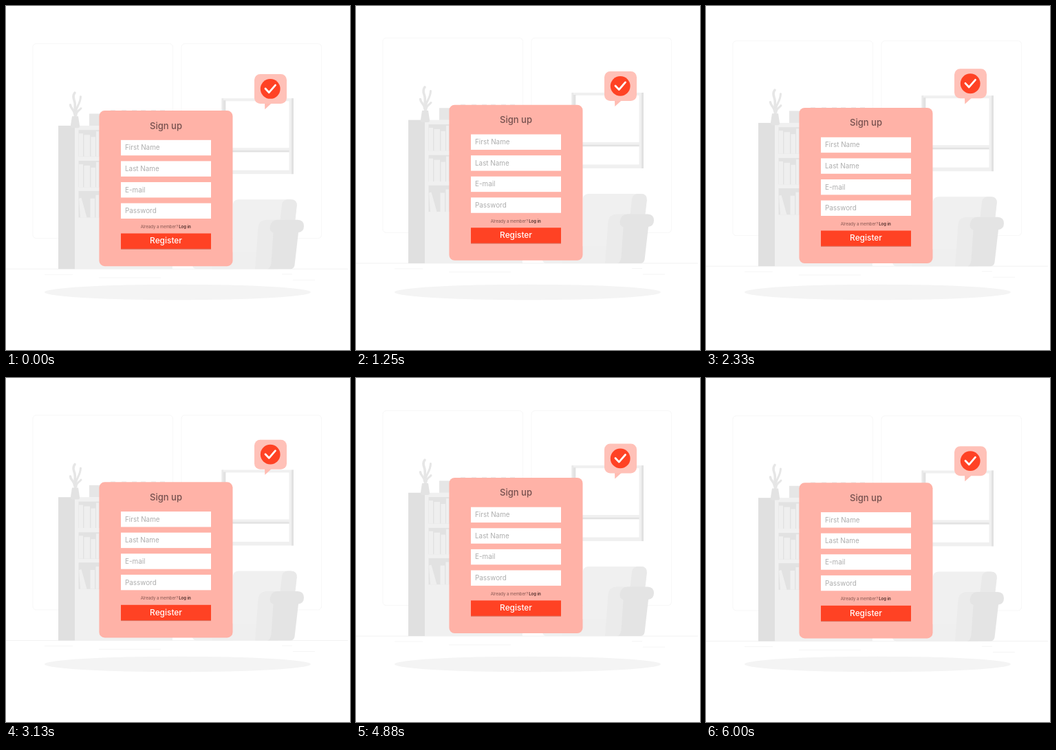
Write an HTML page with a canvas that moves like this. It is 500 by 500 pixels and loops after 6.04 s.

```html
<!DOCTYPE html>
<html lang="en">
<head>
<meta charset="utf-8">
<title>Sign up</title>
<style>
html, body { margin: 0; width: 100%; height: 100%; overflow: hidden; background: #fff; }
canvas { display: block; width: 500px; height: 500px; }
</style>
</head>
<body>
<canvas id="stage"></canvas>
<script>
const LOOP = 6040, LEAD = 40, RISE = 10;
const canvas = document.getElementById('stage');
const ctx = canvas.getContext('2d');
const ratio = Math.max(1, window.devicePixelRatio || 1);
canvas.width = canvas.height = 500 * ratio;

// Linear rise and fall, 0 -> 1 -> 0 over one period
const swing = (t, period) => 1 - Math.abs(1 - 2 * ((t / period) % 1));

function rect(x1, y1, x2, y2, color) {
  ctx.fillStyle = color;
  ctx.fillRect(x1, y1, x2 - x1, y2 - y1);
}

function rounded(x1, y1, x2, y2, r) {
  ctx.beginPath();
  ctx.roundRect(x1, y1, x2 - x1, y2 - y1, r);
}

function shape(d, color) {
  ctx.fillStyle = color;
  ctx.fill(new Path2D(d));
}

function stroke(d, color, width) {
  ctx.strokeStyle = color;
  ctx.lineWidth = width;
  ctx.lineCap = ctx.lineJoin = 'round';
  ctx.stroke(new Path2D(d));
}

function text(str, x, y, size, weight, color, align = 'left') {
  ctx.font = `${weight} ${size}px Inter, "Open Sans", sans-serif`;
  ctx.textAlign = align;
  ctx.fillStyle = color;
  ctx.fillText(str, x, y);
}

function walls() {
  ctx.strokeStyle = '#f7f7f7';
  ctx.lineWidth = 1;
  for (const x of [39, 255]) {
    rounded(x, 55, x + 203.5, 338, 5);
    ctx.stroke();
  }
  rect(0, 382, 497, 383, '#f2f2f2');
  rect(56, 390, 97, 391, '#f6f6f6');
  rect(135, 394.8, 225, 395.8, '#f5f5f5');
  rect(401, 389.6, 416, 390.6, '#f5f5f5');
  rect(417, 398, 449, 399, '#f5f5f5');
}

function bookcase() {
  rect(100, 174.2, 242, 382.5, '#f0f0f0');
  rect(76, 174.2, 100, 382.5, '#e0e0e0');
  for (const y of [180.5, 225.2, 269.2]) rect(105.5, y, 236, y + 38.5, '#e2e2e2');
  // Upright books on two shelves, a leaning one on the third
  for (const y of [180.5, 225.2]) {
    const foot = y + 38.5;
    rect(106, y + 5, 112, foot, '#efefef');
    rect(113.5, y + 7, 122, foot, '#efefef');
    rect(123.5, y + 10, 130, foot, '#efefef');
    rect(131, y + 2, 135, foot, '#efefef');
  }
  shape('M106 280 L109.5 279 L117.5 307.7 L108 307.7 Z', '#efefef');
  rect(122.5, 280, 129, 307.7, '#efefef');
  rect(130.5, 275, 135, 307.7, '#efefef');
  // Ornaments on top
  rect(121, 156.8, 140, 174.2, '#e6e6e6');
  for (const x of [152, 168, 183, 196, 211, 224]) rect(x, 151.2, x + 7, 156, '#efefef');
}

function plant() {
  stroke('M100.5 161 C99 148 102 144 99 137 C97.5 133 98 129 100 126.5', '#e6e6e6', 3.6);
  stroke('M101 157 C101 147 108 144 108.5 132', '#e6e6e6', 3);
  stroke('M99.5 157 C99 150 94 150 93.5 144', '#e6e6e6', 3.4);
  stroke('M102 159 C102 153 107 152 109 149', '#e6e6e6', 3);
  shape('M96 160.5 H105 L107.2 175 Q107 177.5 104.5 177.5 H96.5 Q94 177.5 93.8 175 Z', '#e3e3e3');
}

function pane() {
  rect(313.5, 134.5, 418, 244.5, '#f0f0f0');
  rect(313.5, 134.5, 316, 244.5, '#e9e9e9');
  rect(316, 137.5, 319.5, 239, '#e2e2e2');
  rect(415, 134.5, 418, 244.5, '#e2e2e2');
  rect(319.5, 138.5, 411.5, 206.5, '#fff');
  rect(319.5, 210.2, 411.5, 212.8, '#e2e2e2');
  rect(319.5, 212.8, 411.5, 239, '#fff');
}

function sofa() {
  shape('M270 374 H330 V288 Q331 281.5 338 281.5 H414 Q423 281.5 422.5 290 L414 360 H330 V382.5 H276 Q271 382 270 374 Z', '#f0f0f0');
  shape('M409 281.5 H414 Q423.5 281.5 422.8 291 L419.5 320 H397.5 L401 289 Q402 282 409 281.5 Z', '#e9e9e9');
  rect(300, 357.8, 395, 382.5, '#efefef');
  shape('M378 311 H405 V330 L390 382.5 H362 L366.5 322 Q367.5 311.5 378 311 Z', '#ebebeb');
  shape('M394 311 H424 Q433 311.5 433 320 Q433 328.5 425 329.5 L419.5 377 Q418.5 382.5 413 382.5 H380 Q384.5 381 385.5 374 L388.5 330 Q382 327 384 320 Q386 311.5 394 311 Z', '#e4e4e4');
}

function form() {
  rounded(135.4, 152.3, 329.5, 378.4, 8);
  ctx.fillStyle = '#ffb2a7';
  ctx.fill();
  text('Sign up', 232.5, 178.8, 13, 500, '#74504e', 'center');
  ['First Name', 'Last Name', 'E-mail', 'Password'].forEach((label, i) => {
    const y = 195.1 + i * 30.6;
    rect(167, y, 298, y + 22.4, '#fff');
    text(label, 173, y + 14.6, 9.9, 400, '#adadad');
  });
  text('Already a member?', 195.8, 323.2, 5.95, 400, '#80544f');
  text('Log in', 251.2, 323.2, 6, 700, '#5c3835');
  rect(167, 352.5, 298, 354.1, '#d9705f');
  rect(167, 330.8, 298, 353.1, '#ff4224');
  text('Register', 232.5, 345.6, 11.9, 500, '#fff', 'center');
}

function bubble() {
  shape('M376 141 L376.3 150.3 L386.5 141 Z', '#ffbcb2');
  rounded(361, 99.2, 408, 142.2, 8.5);
  ctx.fillStyle = '#ffc1b8';
  ctx.fill();
  ctx.beginPath();
  ctx.arc(384.2, 120.6, 14.4, 0, Math.PI * 2);
  ctx.fillStyle = '#ff4224';
  ctx.fill();
  stroke('M377 120.2 L382.3 125.8 L391.5 115.2', '#fff', 2.8);
}

function lifted(amount, ...parts) {
  ctx.save();
  ctx.translate(0, -RISE * amount);
  parts.forEach(part => part());
  ctx.restore();
}

function draw(now) {
  const t = (now + LEAD) % LOOP;
  ctx.setTransform(ratio, 0, 0, ratio, 0, 0);
  rect(0, 0, 500, 500, '#fff');
  ctx.beginPath();
  ctx.ellipse(249.5, 416, 193.5, 11.3, 0, 0, Math.PI * 2);
  ctx.fillStyle = '#f4f4f4';
  ctx.fill();
  lifted(swing(t, LOOP / 2), walls, bookcase, plant, pane, sofa, form);
  lifted(swing(t, LOOP), bubble);
}

let start;
function tick(now) {
  start ??= now;
  draw(now - start);
  requestAnimationFrame(tick);
}
draw(0);
requestAnimationFrame(tick);
</script>
</body>
</html>
```
